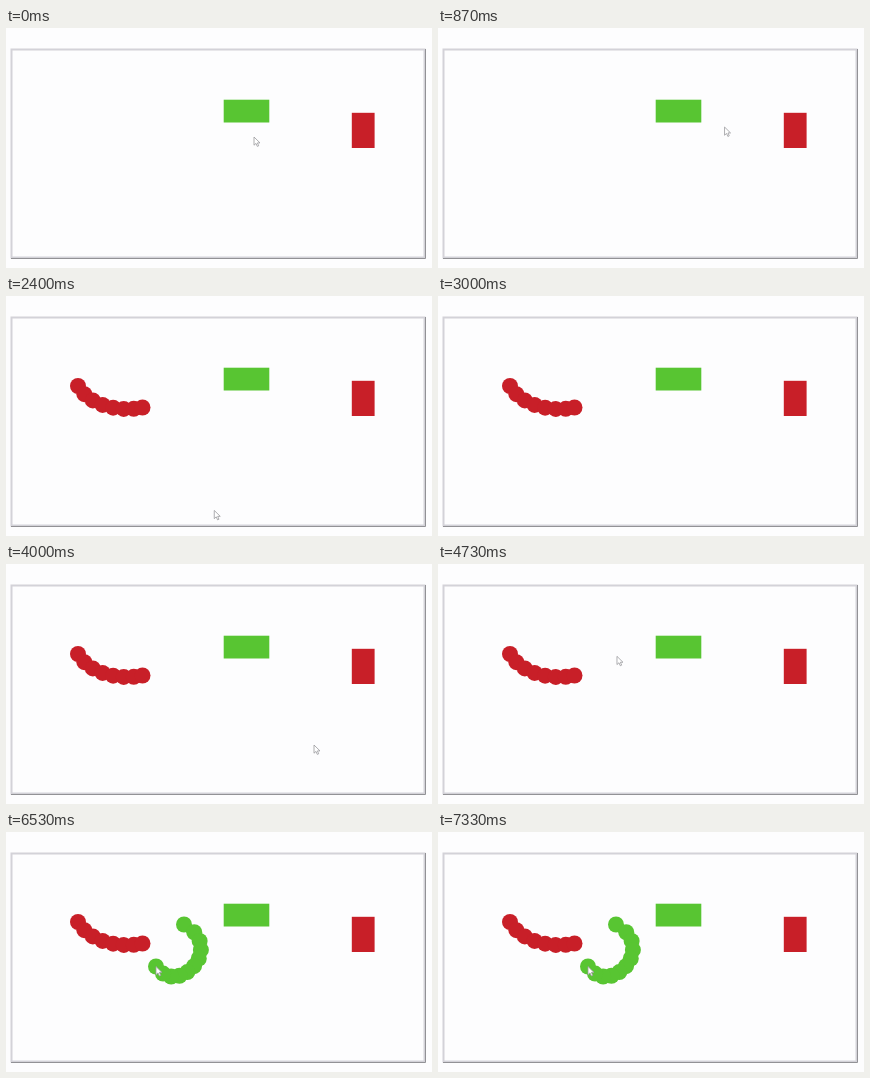
These frames come from a looping animation (426 by 240 pixels, 7390 ms). An HTML page:

```html
<!DOCTYPE html>
<html lang="en">
<head>
<meta charset="utf-8">
<title>Paint strokes</title>
<style>
  html, body { margin: 0; width: 100%; height: 100%; overflow: hidden; background: #fdfdfd; }
  svg { display: block; width: 100vw; height: 100vh; }
</style>
</head>
<body>
<svg viewBox="0 0 426 240">
  <rect width="426" height="240" fill="#fdfdfe"/>
  <g fill="none">
    <rect x="5.5" y="21.5" width="413" height="208" stroke="#d3d2d8" stroke-width="2"/>
    <path d="M419.5 21V230.5H5" stroke="#929296"/>
  </g>
  <rect x="217.7" y="71.7" width="45.6" height="22.8" fill="#58c532"/>
  <rect x="345.8" y="84.8" width="22.8" height="35.2" fill="#c81f28"/>
  <g id="dots"></g>
  <path id="cursor" d="M0 0V8.2L2 6.4L3.3 9.4L4.7 8.8L3.4 5.9H6Z"
        fill="#fff" stroke="#9a9a9e" stroke-width=".8" stroke-linejoin="round"/>
</svg>
<script>
  const LOOP = 7390, TICK = 1000 / 15, RADIUS = 8;

  // Each stroke stamps dots at even steps along a cubic curve.
  const red = { color: '#c81f28', start: 1360, gap: 75, count: 8,
    curve: [[72, 90], [84, 111.5], [118, 116], [136.5, 111.5]] };
  const green = { color: '#58c532', start: 4760, gap: 95, count: 11,
    curve: [[178, 92.5], [221, 116], [171, 166], [150, 134.5]] };

  const endOf = s => s.start + (s.count - 1) * s.gap;

  function curveAt([a, b, c, d], u) {
    const v = 1 - u;
    return [0, 1].map(k =>
      v * v * v * a[k] + 3 * v * v * u * b[k] + 3 * v * u * u * c[k] + u * u * u * d[k]);
  }

  const stop = (time, x, y) => ({ time, pos: [x, y] });
  const strokeStops = s => [
    { time: s.start, pos: s.curve[0], curve: s.curve },
    { time: endOf(s), pos: s.curve[3] }
  ];

  const stops = [
    stop(0, 248, 109),
    stop(630, 357, 102),
    ...strokeStops(red),
    stop(2700, 240, 260),
    stop(4000, 308, 181),
    stop(4400, 240, 83),
    ...strokeStops(green),
    stop(LOOP, ...green.curve[3])
  ];

  const layer = document.getElementById('dots');
  const cursor = document.getElementById('cursor');
  const dots = [];

  for (const s of [red, green]) {
    for (let i = 0; i < s.count; i++) {
      const [cx, cy] = curveAt(s.curve, i / (s.count - 1));
      const el = document.createElementNS('http://www.w3.org/2000/svg', 'circle');
      const attrs = { cx, cy, r: RADIUS, fill: s.color };
      for (const name in attrs) el.setAttribute(name, attrs[name]);
      layer.append(el);
      dots.push({ el, time: s.start + i * s.gap });
    }
  }

  function cursorAt(t) {
    const i = stops.findIndex(s => s.time > t);
    const from = stops[i - 1], to = stops[i];
    const p = (t - from.time) / (to.time - from.time);
    if (from.curve) return curveAt(from.curve, p);
    const e = p * p * (3 - 2 * p);
    return from.pos.map((v, k) => v + (to.pos[k] - v) * e);
  }

  function draw(time) {
    const t = Math.floor((time % LOOP + 4) / TICK) * TICK;
    for (const d of dots) d.el.style.display = t >= d.time ? '' : 'none';
    cursor.setAttribute('transform', `translate(${cursorAt(Math.min(t, LOOP - 1))})`);
  }

  const begin = performance.now();
  function loop() {
    draw(performance.now() - begin);
    requestAnimationFrame(loop);
  }
  loop();
</script>
</body>
</html>
```
